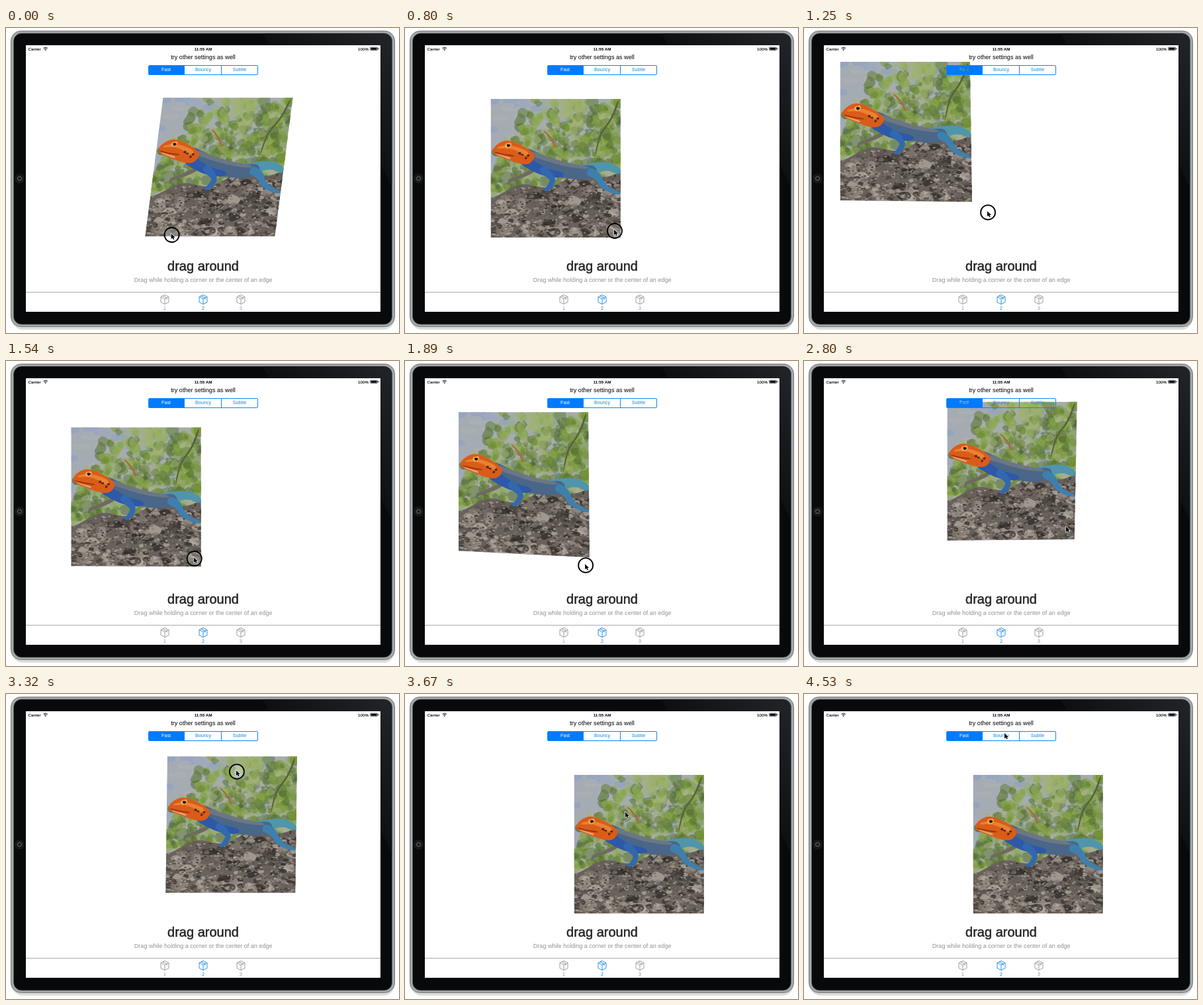
Recreate the animation shown at these times as an HTML page with a canvas. Size 594 px wide and 460 px high, loop 4.58 s.

```html
<!DOCTYPE html>
<html lang="en">
<head>
<meta charset="utf-8">
<title>Drag around</title>
<style>
html, body { margin: 0; width: 594px; height: 460px; overflow: hidden; background: #fff; }
svg, canvas { position: absolute; left: 0; top: 0; }
text { font-family: "Liberation Sans", Arial, sans-serif; text-anchor: middle; }
</style>
</head>
<body>
<svg width="594" height="460">
  <defs>
    <linearGradient id="glare" x1="0" y1="1" x2="1" y2="0">
      <stop offset=".35" stop-color="#08090a"/><stop offset="1" stop-color="#222428"/>
    </linearGradient>
    <path id="box" fill="none" stroke-width=".9" stroke-linejoin="round"
      d="M0-7 6-4V4L0 7-6 4V-4ZM-6-4 0-1 6-4M0-1V7M-3-5.5 3-2.5V0"/>
  </defs>
  <rect x="9" y="8" width="578" height="447" rx="16" fill="#dcdddd"/>
  <rect x="7.5" y="4.5" width="580" height="446" rx="15" fill="#a5a8a7" stroke="#747776"/>
  <rect x="11.5" y="8" width="572" height="439" rx="12" fill="#08090a" stroke="#5b5e5d" stroke-width=".8"/>
  <path d="M388 8.4H571.5a11.6 11.6 0 0 1 11.6 11.6V240L566 205V26H398Z" fill="url(#glare)"/>
  <rect x="30" y="26" width="536" height="402" fill="#fff"/>
  <circle cx="20.5" cy="227" r="7.5" fill="#16181a"/>
  <circle cx="20.5" cy="227" r="3" fill="none" stroke="#77797b" stroke-width=".9"/>

  <g font-size="6.2" stroke="#000" stroke-width=".12">
    <text x="43" y="34">Carrier</text>
    <text x="298" y="34" font-weight="bold" stroke="none">11:55 AM</text>
    <text x="540" y="34">100%</text>
  </g>
  <g fill="none" stroke="#000">
    <path d="M56.6 30.4q3.1-2.6 6.2 0M57.9 32q1.8-1.5 3.6 0"/>
    <circle cx="59.7" cy="33.4" r=".4"/>
    <rect x="550.5" y="29" width="11" height="4.6" rx="1" stroke-width=".6"/>
    <path d="M551.5 31.3h9" stroke-width="3"/><path d="M562.6 30.3v2"/>
  </g>
  <text x="298" y="47" font-size="9.1">try other settings as well</text>
  <text x="298" y="366" font-size="20" fill="#222" stroke="#222" stroke-width=".45">drag around</text>
  <text x="298.2" y="383" font-size="9.05" fill="#929292">Drag while holding a corner or the center of an edge</text>
  <path d="M30 398.5H566" stroke="#aaa"/>
  <g font-size="7" fill="#929292">
    <use href="#box" x="240" y="409.5" stroke="#929292"/><text x="240" y="424.5">1</text>
    <use href="#box" x="298" y="409.5" stroke="#1286e0"/><text x="298" y="424.5" fill="#1286e0">2</text>
    <use href="#box" x="355" y="409.5" stroke="#929292"/><text x="355" y="424.5">3</text>
  </g>
</svg>
<canvas id="photo" width="594" height="460"></canvas>
<svg width="594" height="460">
  <mask id="cut">
    <rect x="210" y="50" width="70" height="30" fill="#fff"/>
    <text x="242" y="65.4" font-size="7.2">Fast</text>
  </mask>
  <rect x="215.5" y="56.5" width="54.5" height="14" rx="1.5" fill="#007aff" mask="url(#cut)"/>
  <g fill="none" stroke="#0f84f5">
    <rect x="215.5" y="56.5" width="165" height="14" rx="1.5"/><path d="M269.5 56V71M325.5 56V71"/>
  </g>
  <g font-size="7.2" fill="#1286e0">
    <text x="298" y="65.4">Bouncy</text><text x="353" y="65.4">Subtle</text>
  </g>
  <g id="cursor">
    <circle id="ring" r="11" fill="#fff" fill-opacity=".25" stroke="#000" stroke-width="1.8"/>
    <path d="M-1-2V6.2L1 4.5 2.4 7.3 3.8 6.6 2.5 3.9H5Z" stroke="#fff" stroke-width="1.2" paint-order="stroke"/>
  </g>
</svg>
<script>
const LOOP = 4580, W = 196, H = 209, HOME = [255.8, 122];
const $ = id => document.getElementById(id);
const ctx = $("photo").getContext("2d");
const clamp = (v, a, b) => Math.max(a, Math.min(b, v));

// pointer path: time, x, y
const path = [
  [-90, 354, 312], [0, 251, 312], [180, 205, 314], [400, 227, 314],
  [720, 317, 306], [800, 317, 306], [1170, 242, 250], [1210, 245, 252], [1250, 278, 278],
  [1500, 286, 300], [1760, 267, 270], [1850, 270, 286], [1890, 273, 308],
  [2150, 320, 330], [2660, 408, 263], [2760, 400, 259], [2800, 397, 252],
  [2960, 311, 72], [3420, 354, 134], [3670, 334, 180], [4400, 304, 61], [LOOP, 304, 61]
];
// each drag holds one point of the photo, given as fractions u, v
const drags = [
  { from: -90, to: 430, u: .5, v: 1 },
  { from: 740, to: 2760, u: 1, v: 1 },
  { from: 2960, to: 3420, u: .5, v: 0 }
];

// monotone cubic interpolation along the path
function pointer(t) {
  const last = path.length - 2;
  let i = 0;
  while (i < last && t >= path[i + 1][0]) i++;
  const a = path[i], b = path[i + 1], span = b[0] - a[0], s = (t - a[0]) / span;
  const slope = (k, c) => {
    const [p, q] = path.slice(clamp(k, 0, last));
    return (q[c] - p[c]) / (q[0] - p[0]);
  };
  const tangent = (k, c) => {
    const p = slope(k - 1, c), q = slope(k, c);
    return p * q > 0 ? 2 * p * q / (p + q) * span : 0;
  };
  return [1, 2].map(c => {
    const d = b[c] - a[c], m = tangent(i, c), n = tangent(i + 1, c);
    return a[c] + s * (m + s * (3 * d - 2 * m - n + s * (m + n - 2 * d)));
  });
}

// a corner trails the pointer, the more so the farther it is from the held point
function corner(u, v, t) {
  const pos = [HOME[0] + u * W, HOME[1] + v * H];
  for (const d of drags) {
    const lag = 40 + 40 * Math.max(Math.abs(u - d.u), Math.abs(v - d.v));
    const now = pointer(clamp(t - lag, d.from, d.to)), end = pointer(d.to);
    pos.forEach((_, k) => pos[k] += now[k] - end[k]);
  }
  return pos;
}

let seed = 11;
const rnd = () => (seed = seed * 16807 % 2147483647) / 2147483647;
const pick = list => list[Math.floor(rnd() * list.length)];
const pairs = text => text.split(" ").map(p => p.split(",").map(Number));

// the picture: flat shapes in its own W x H space
const shapes = [];
const shape = (fill, text) => shapes.push({ fill, pts: pairs(text) });
function blob(fill, x, y, rx, ry) {
  const pts = Array.from({ length: 7 }, (_, k) => {
    const a = k * Math.PI * 2 / 7, r = .6 + rnd() * .7;
    return [x + Math.cos(a) * rx * r, y + Math.sin(a) * ry * r];
  });
  shapes.push({ fill, pts });
}
// a limb along a few points, its width going from w0 to w1
function taper(fill, w0, w1, text) {
  const p = pairs(text), n = p.length - 1, left = [], right = [];
  p.forEach(([x, y], i) => {
    const a = p[Math.max(0, i - 1)], b = p[Math.min(n, i + 1)];
    const r = (w0 + (w1 - w0) * i / n) / 2 / Math.hypot(b[0] - a[0], b[1] - a[1]);
    const dx = (a[1] - b[1]) * r, dy = (b[0] - a[0]) * r;
    left.push([x + dx, y + dy]);
    right.unshift([x - dx, y - dy]);
  });
  shapes.push({ fill, pts: [...left, ...right] });
}

for (let k = 0; k < 40; k++)
  blob(pick(["#8fa3c6", "#9da9bf", "#b0b1b1"]) + "a0", rnd() * W, rnd() * 90, 14, 6);
for (let k = 0; k < 650; k++) {
  const x = rnd() * W, y = rnd() * 150, size = 3 + rnd() * 8;
  if (rnd() < (x - 60 + y * .9) / 60)
    blob(pick(["#7a9c36", "#8aa948", "#5f7d2f", "#a0b468", "#4f6a2c", "#a9b094"]) + "80", x, y, size, size);
}
taper("#59603a", 3, 2, "193,2 182,32 165,52 158,84");
taper("#a8683c", 2, 3, "80,48 92,60 98,74");

const ridge = x => 143 - .18 * x - 6 * Math.sin(x / 14 - 1.6);
const rock = [[W, H], [0, H]];
for (let x = 0; x <= W; x += 7) rock.push([x, ridge(x)]);
shapes.push({ fill: "#69625c", sharp: true, pts: rock });
// broad faces first, then ever finer grain
for (const [count, size] of [[70, 12], [260, 5], [700, 2.2]])
  for (let k = 0; k < count; k++) {
    const x = rnd() * W, y = 105 + rnd() * 104;
    if (y > ridge(x) + size * .5)
      blob(pick(["#2b2725", "#453f3b", "#5e5650", "#82786f", "#a0978d", "#b9b1a7"]) + "b0",
        x, y, size, size * .6);
  }

// lizard
taper("#6f6a60", 7, 3, "64,108 46,117 28,123 26,130");
taper("#4f95ac", 20, 9, "132,110 148,106 164,102 182,102 196,111");
taper("#4a6688", 26, 19, "44,83 70,94 100,106 132,112 160,108");
taper("#2e58a8", 18, 9, "46,88 64,102 86,112 110,115");
taper("#6c7684", 8, 5, "60,82 84,90 112,99 148,104");
taper("#3268b0", 13, 5, "76,104 88,114 95,124 86,136 80,137");
taper("#3d80ae", 14, 4, "146,108 162,116 168,130 182,139 196,143");
shape("#da5c18", "2,77 9,68 24,61 44,68 58,77 68,85 60,98 46,99 24,91 5,84");
taper("#e98232", 3, 8, "10,74 26,71 44,77 56,84");
taper("#8e3516", 1.5, 2, "5,80 20,84 36,86");
taper("#e8a878", 1, 3, "8,83 20,87 30,90");
for (let k = 0; k < 4; k++) blob("#57281a", 42 + rnd() * 18, 78 + rnd() * 12, 2.6, 2);
blob("#f4a34e", 26.5, 70, 5, 4.5);
blob("#111", 26.5, 70, 3.4, 3.2);

function drawPhoto(t) {
  const [tl, tr, br, bl] = [[0, 0], [1, 0], [1, 1], [0, 1]].map(([u, v]) => corner(u, v, t));
  const mix = (a, b, s) => [a[0] + (b[0] - a[0]) * s, a[1] + (b[1] - a[1]) * s];
  const map = ([x, y]) => mix(mix(tl, tr, x / W), mix(bl, br, x / W), y / H);
  const fill = ({ pts, fill, sharp }) => {
    const p = pts.map(map), n = p.length;
    ctx.beginPath();
    if (sharp) p.forEach(c => ctx.lineTo(...c));
    else {
      ctx.moveTo(...mix(p[n - 1], p[0], .5));
      p.forEach((c, i) => ctx.quadraticCurveTo(...c, ...mix(c, p[(i + 1) % n], .5)));
    }
    ctx.fillStyle = fill;
    ctx.fill();
  };
  ctx.clearRect(0, 0, 594, 460);
  ctx.save();
  fill({ pts: [[0, 0], [W, 0], [W, H], [0, H]], fill: "#a5abb3", sharp: true });
  ctx.clip();
  shapes.forEach(fill);
  ctx.restore();
}

const start = performance.now();
function frame() {
  const t = (performance.now() - start) % LOOP;
  drawPhoto(t);
  $("cursor").setAttribute("transform", `translate(${pointer(t)})`);
  $("ring").style.display = drags.some(d => t >= d.from && t < d.to) ? "" : "none";
  requestAnimationFrame(frame);
}
frame();
</script>
</body>
</html>
```
